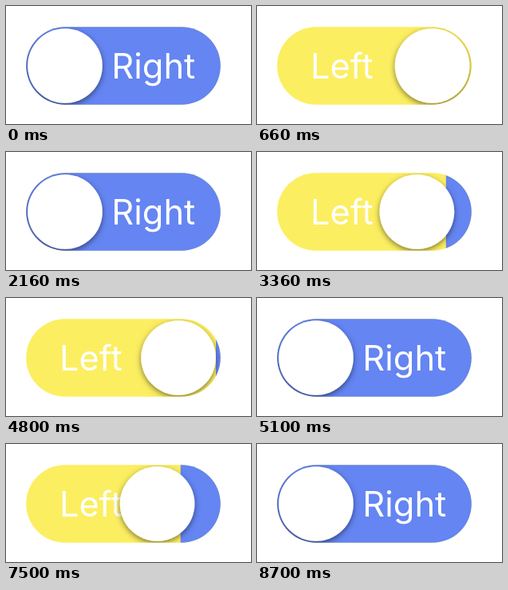
An HTML page for the animation above (8.76 s loop, 307 px wide and 148 px high).

```html
<!DOCTYPE html>
<html lang="en">
<head>
<meta charset="utf-8">
<title>Label switch</title>
<style>
  html, body { margin: 0; width: 100%; height: 100%; overflow: hidden; background: #fff; }
  svg { display: block; width: 307px; height: 148px; }
  text { font: 400 43.4px Inter, Roboto, sans-serif; fill: #fff; text-anchor: middle; }
</style>
</head>
<body>
<svg viewBox="0 0 307 148">
  <defs>
    <clipPath id="track"><rect x="25.2" y="26.3" width="243.6" height="97.4" rx="48.7"/></clipPath>
    <filter id="shadow" x="-30%" y="-30%" width="160%" height="160%">
      <feDropShadow dx="0" dy="2.5" stdDeviation="3.6" flood-color="#000" flood-opacity=".5"/>
    </filter>
  </defs>
  <g clip-path="url(#track)">
    <rect x="25" y="26" width="244" height="98" fill="#fcee61"/>
    <text x="106.3" y="91">Left</text>
    <g id="right">
      <rect x="25" y="26" width="244" height="98" fill="#6485f2"/>
      <text x="184.8" y="90.8">Right</text>
    </g>
    <circle id="knob" cx="74" cy="75" r="46.8" fill="#fff" filter="url(#shadow)"/>
  </g>
</svg>
<script>
  const LOOP = 8760, TICK = 60, DURATION = 300;
  const PANEL_TRAVEL = 244, KNOB_TRAVEL = 145.6;
  // Start times of the alternating moves: knob to the right, then back to the left.
  const toggles = [270, 1770, 3131, 4770, 6064, 7410];

  const right = document.getElementById('right');
  const knob = document.getElementById('knob');

  const ease = u => (1 - Math.cos(Math.PI * Math.min(1, Math.max(0, u)))) / 2;

  function progressAt(time) {
    return toggles.reduce((sum, start, i) =>
      sum + (i % 2 ? -1 : 1) * ease((time - start) / DURATION), 0);
  }

  function draw(now) {
    const time = Math.floor((now % LOOP) / TICK) * TICK;
    const p = progressAt(time);
    right.setAttribute('transform', `translate(${PANEL_TRAVEL * p} 0)`);
    knob.setAttribute('transform', `translate(${KNOB_TRAVEL * p} 0)`);
  }

  const begin = performance.now();
  function frame() {
    draw(performance.now() - begin);
    requestAnimationFrame(frame);
  }
  frame();
</script>
</body>
</html>
```
